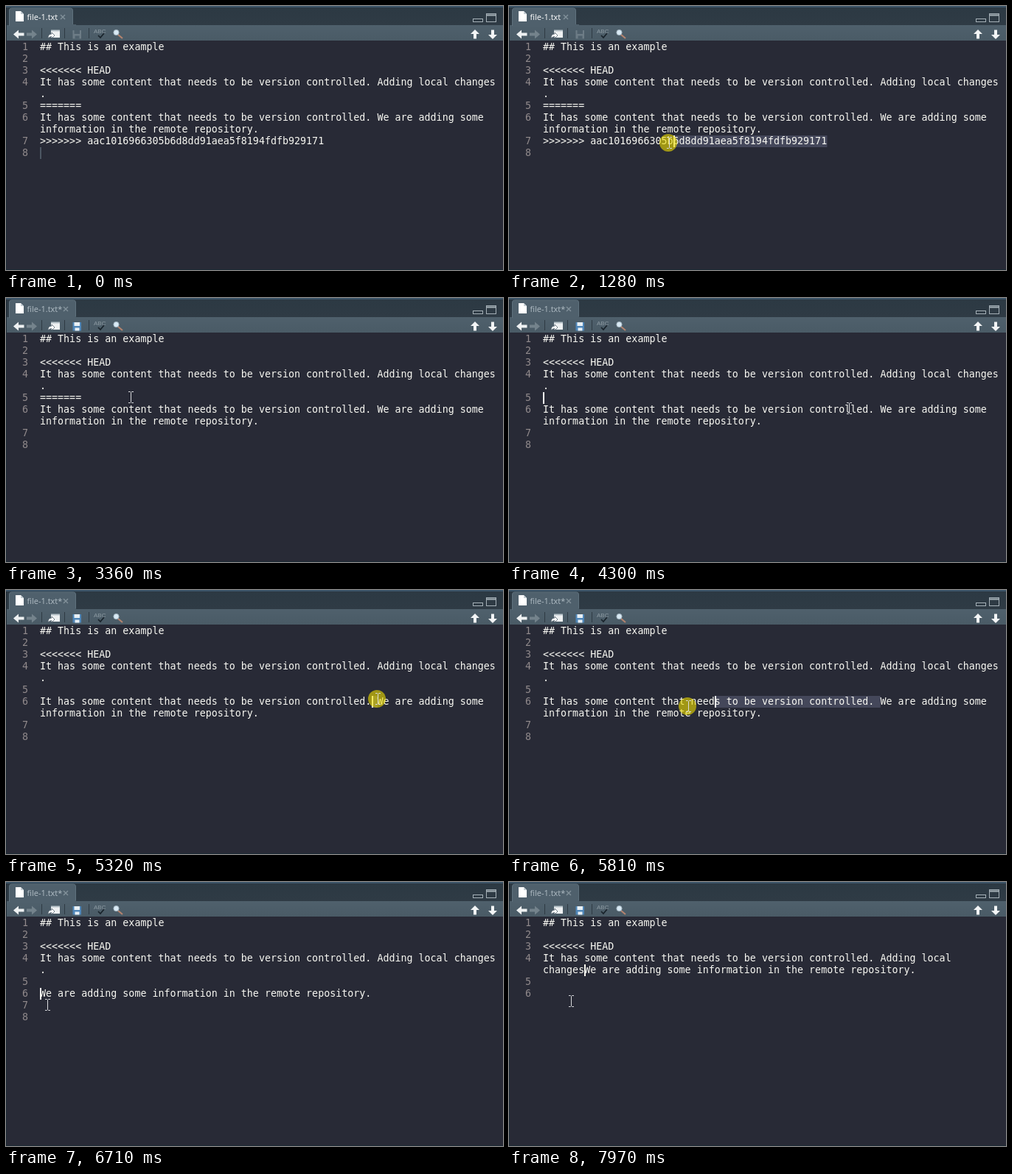
An HTML page for the animation above (8 s loop, 674 px wide and 359 px high).

```html
<!DOCTYPE html>
<html lang="en">
<head>
<meta charset="utf-8">
<title>Resolving a merge conflict</title>
<style>
  html, body { margin: 0; width: 100%; height: 100%; overflow: hidden; background: #282a36; }
  svg { display: block; }
  .code text { font: 13.34px "DejaVu Sans Mono", monospace; white-space: pre; fill: #f8f8f2; }
  .code .num { fill: #918a8c; text-anchor: end; }
  .tab { font: 11px "Open Sans", sans-serif; }
</style>
</head>
<body>
<svg width="674" height="359" viewBox="0 0 674 359">
  <defs>
    <linearGradient id="strip" x2="0" y2="1">
      <stop offset="0" stop-color="#2c3943"/><stop offset="1" stop-color="#2f3b45"/>
    </linearGradient>
    <linearGradient id="bar" x2="0" y2="1">
      <stop offset="0" stop-color="#4f606c"/><stop offset="1" stop-color="#4a5b66"/>
    </linearGradient>
  </defs>
  <rect width="674" height="359" fill="#282a36"/>
  <rect width="674" height="27" fill="url(#strip)"/>
  <rect width="674" height="2" fill="#3c5468"/>
  <rect y="26" width="674" height="21" fill="url(#bar)"/>
  <path d="M.5 2V359M0 358.5H674" stroke="#1c2a34"/>

  <path id="tab" fill="#4f606c" stroke="#5f717d"/>
  <rect x="5" y="25" width="90" height="3" fill="#4f606c"/>
  <path d="M13 7h7l4 4v10H13z" fill="#fff"/>
  <path d="M20 7v4h4" fill="#c5ced4"/>
  <text id="name" class="tab" x="28.5" y="19"></text>
  <path id="close" d="M-3-3L3 3M3-3L-3 3" stroke="#83929b" stroke-width="1.4"/>

  <g fill="none" stroke="#a5b0b7">
    <rect x="633.5" y="17.5" width="13" height="4"/>
    <rect x="651.5" y="10.5" width="13" height="11"/>
    <path d="M651 12.5h14" stroke-width="2"/>
  </g>

  <path id="back" d="M10 38.500l7-6v4h7.500v4H17v4z" fill="#eef1f2"/>
  <path d="M42 38.500l-7-6v4h-7v4h7v4z" fill="#74838c"/>
  <path d="M48.500 30v14M79.500 30v14M112.500 30v14" stroke="#2e3a43"/>
  <path d="M61 33h12v10H61z" fill="#eef1f2"/>
  <path d="M61 33.500h12" stroke="#b9c4ca" stroke-width="2"/>
  <path d="M57 44q0-6 5-6v-2l4 4-4 4v-2.500q-3 0-5 2.500z" fill="#fff" stroke="#54646f" stroke-width=".8"/>
  <g id="save">
    <path d="M90.500 33h11.500v11.500h-11.500z"/>
    <path class="paper" d="M92.500 33h7.500v5h-7.500zM93.500 40.500h6v4h-6z"/>
  </g>
  <text x="119" y="37" textLength="0" style="font:8px 'Liberation Sans',sans-serif" fill="#8e9ba3">ABC</text>
  <path d="M125 40l3 3 5-6" fill="none" stroke="#18222a" stroke-width="1.700"/>
  <path d="M152 39l6 5" stroke="#b3836f" stroke-width="2.200"/>
  <circle cx="149.500" cy="36" r="3.600" fill="#d9eaf5" stroke="#a9bac5"/>
  <g fill="#f3f5f6">
    <path d="M636 32l6 6h-4v6.500h-4V38h-4z"/>
    <path d="M660 45l6-6h-4v-6.500h-4V39h-4z"/>
  </g>

  <rect id="sel" fill="#44475a"/>
  <g class="code" id="code"></g>
  <g id="marks" fill="none" stroke="#6b6640"><rect rx="2.500"/><rect rx="2.500"/></g>
  <rect id="caret" width="2" height="16"/>
  <circle id="halo" r="12" fill="#f0e000" opacity=".6"/>
  <path id="beam" d="M-3.500-7.500h2.500l1 1 1-1h2.500M0-6.500v13M-3.500 7.500h2.500l1-1 1 1h2.500" fill="none" stroke="#d9dadd"/>
  <path id="arrow" d="M0 0v16l4-3.500 2.500 6 2.500-1-2.500-6h5z" fill="#fff" stroke="#111" stroke-width=".9"/>
</svg>
<script>
const LOOP = 8000, STEP = 67, CW = 8.031, LEFT = 46, TOP = 48, LINE = 16, COLS = 77;
const $ = id => document.getElementById(id);
const SHARED = "It has some content that needs to be version controlled. ";
const ADDED = "We are adding some information in the remote repository.";

// Pointer hotspot: time, x, y
const path = [
  [130, 597, 307], [340, 500, 225], [610, 445, 172], [743, 445, 172], [880, 444, 184],
  [1550, 64, 188], [1770, 45, 191], [1900, 31, 189], [3290, 31, 189], [3360, 168, 135],
  [3490, 110, 135], [3700, 12, 133], [3900, 12, 133], [3970, 60, 136], [4300, 460, 150],
  [4550, 509, 165], [4650, 505, 150], [5000, 503, 148], [5330, 503, 148], [5460, 498, 148],
  [5810, 242, 158], [6220, 52, 158], [6290, 45, 157], [6360, 41, 157], [6643, 41, 157],
  [6710, 55, 167], [7240, 83, 162]
];
// Mouse selections: keys are time, column
const drags = [
  { row: 8, from: 48, end: 2760, keys: [[880, 48], [1550, 5], [1770, 1], [1900, 0]] },
  { row: 5, from: 7, end: 4170, keys: [[3490, 7], [3700, 0]] },
  { row: 6, from: 57, end: 6710, keys: [[5260, 57], [5530, 54], [5810, 29], [6290, 0]] }
];
// Resting caret: time, row, column
const rests = [[0, 9, 0], [2760, 8, 0], [4170, 5, 0], [6710, 6, 0], [6900, 5, 0], [7100, 4, 1], [7970, 4, 7]];
const blinks = [[2430, 2760], [3360, 3490], [4720, 5260], [7890, 7970]];
const presses = [[880, 2170], [3490, 3900], [5260, 6570]];
const away = [[0, 130], [2760, 3360]];

const within = (t, spans) => spans.some(([a, b]) => t >= a && t < b);
const last = (t, keys) => keys.filter(k => k[0] <= t).pop() || keys[0];
const show = (el, on) => el.setAttribute("visibility", on ? "visible" : "hidden");
const set = (el, attrs) => { for (const k in attrs) el.setAttribute(k, attrs[k]); };

function sample(t, keys) {
  const a = last(t, keys), b = keys[keys.indexOf(a) + 1];
  if (!b || t <= a[0]) return a.slice(1);
  const span = b[0] - a[0], steps = Math.max(1, Math.round(span / STEP));
  const f = Math.min(1, Math.floor((t - a[0]) / span * steps + .1) / steps);
  return a.slice(1).map((v, i) => v + (b[i + 1] - v) * f);
}

function documentAt(t) {
  const lines = [
    "## This is an example", "", "<<<<<<< HEAD",
    SHARED + "Adding local changes" + (t < 7970 ? "." : ""),
    t < 4170 ? "=======" : "",
    (t < 6710 ? SHARED : "") + ADDED,
    t < 2760 ? ">>>>>>> aac1016966305b6d8dd91aea5f8194fdfb929171" : "", ""
  ];
  if (t >= 6900) lines.splice(4, 1);
  if (t >= 7100) lines[3] += lines.splice(4, 1)[0];
  return lines;
}

function wrap(s) {
  if (s.length <= COLS) return [s];
  const head = s.match(/^.{1,77}\b/)[0];
  return [head, ...wrap(s.slice(head.length))];
}

const rows = Array.from({ length: 10 }, (_, i) => ["num", "txt"].map(cls => {
  const el = document.createElementNS("http://www.w3.org/2000/svg", "text");
  set(el, { class: cls, x: cls === "num" ? 30 : LEFT, y: TOP + LINE * i + 12 });
  return $("code").appendChild(el);
}));
const put = (el, s) => { if (el.textContent !== s) el.textContent = s; };

function drawText(t) {
  const out = documentAt(t).flatMap((s, i) => wrap(s).map((part, j) => [j ? "" : String(i + 1), part]));
  rows.forEach((pair, i) => pair.forEach((el, j) => put(el, out[i] ? out[i][j] : "")));
}

function drawCaret(t) {
  const drag = drags.find(d => t >= d.keys[0][0] && t < d.end);
  let [, row, col] = last(t, rests);
  let edge = false;
  show($("sel"), drag);
  if (drag) {
    row = drag.row;
    col = Math.round(sample(t, drag.keys)[0]);
    const line = rows[row][1].textContent;
    const x = LEFT + col * CW, width = (drag.from - col) * CW;
    set($("sel"), { x, y: TOP + row * LINE, width, height: LINE });
    edge = col < drag.from && /\w/.test(line.slice(col, drag.from)) &&
      !(/\w/.test(line[col - 1] || " ") && /\w/.test(line[col]));
    // Whole-word selections are outlined wherever they occur
    [row, row === 6 ? 3 : row].forEach((r, i) =>
      set($("marks").children[i], { x: x + .5, y: TOP + r * LINE - .5, width, height: LINE }));
  }
  show($("marks"), edge);
  set($("caret"), { x: LEFT + Math.round(col * CW), y: TOP + row * LINE, fill: t < 880 ? "#4c5662" : "#f8f8f0" });
  show($("caret"), !within(t, blinks));
}

function drawPointer(t) {
  const [x, y] = sample(t, path).map(Math.round);
  const visible = !within(t, away), gutter = x < 43;
  set($("halo"), { cx: x, cy: y });
  set($("beam"), { transform: `translate(${x + 1.5} ${y})` });
  set($("arrow"), { transform: `translate(${x} ${y})` });
  show($("halo"), within(t, presses));
  show($("beam"), visible && !gutter);
  show($("arrow"), visible && gutter);
}

function drawTab(t) {
  const dirty = t >= 2760, right = dirty ? 94.5 : 90.5;
  set($("tab"), { d: `M4.500 27V6q0-3 3-3H${right - 3}q3 0 3 3V27` });
  put($("name"), dirty ? "file-1.txt*" : "file-1.txt");
  set($("name"), { fill: dirty ? "#b0bcc4" : "#fff" });
  set($("close"), { transform: `translate(${dirty ? 81 : 77} 15)` });
  set($("save"), { fill: dirty ? "#4f86b8" : "#6d7c86" });
  set($("save").lastElementChild, { fill: dirty ? "#e8f0f6" : "#4f606c" });
}

function draw(t) {
  drawText(t);
  drawCaret(t);
  drawPointer(t);
  drawTab(t);
}

const start = performance.now();
function tick() {
  draw((performance.now() - start) % LOOP);
  requestAnimationFrame(tick);
}
draw(0);
requestAnimationFrame(tick);
</script>
</body>
</html>
```
